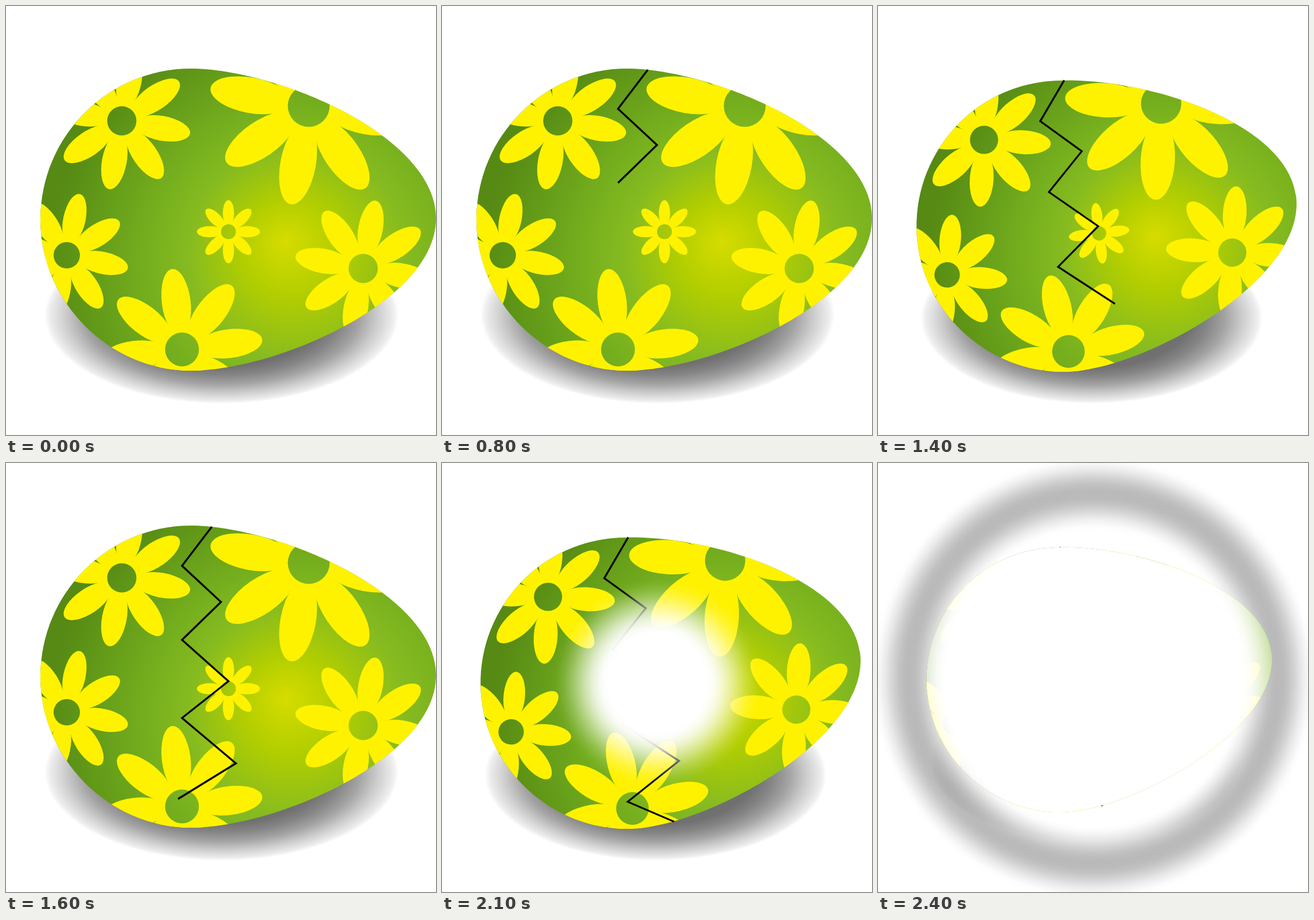
Animation, 750 px wide and 747 px high, one loop 2.5 s. Source, as an HTML page with a canvas:

```html
<!DOCTYPE html>
<html lang="en">
<head>
<meta charset="utf-8">
<title>Hatching egg</title>
<style>
html, body { margin: 0; width: 100%; height: 100%; overflow: hidden; background: #fff; }
canvas { display: block; }
</style>
</head>
<body>
<canvas id="stage" width="750" height="747"></canvas>
<script>
const ctx = document.getElementById('stage').getContext('2d');
const TAU = Math.PI * 2;
const LOOP = 2500;

const egg = new Path2D(
  'M60 372C60 225 180 109 322 109C470 109 750 225 750 370' +
  'C750 515 470 635 322 635C180 635 60 515 60 372Z');

// x, y, petal length, hole radius, turn in degrees
const flowers = [
  [202, 200, 121, 25.5, 10.5],
  [528, 174, 174, 36.5, 10.4],
  [106, 434, 109, 23, 12],
  [307, 598, 141, 29.5, -7],
  [623, 457, 120, 25.5, 10.5],
  [388, 393, 55, 13, 0]
];

const crack = [
  [359, 111], [307, 179], [375, 242], [307, 308], [388, 380],
  [307, 444], [401, 523], [300, 585], [379, 631]
];

// Soft-edged light: radius at half strength and width of the fade
const lights = [[62, 75], [135, 100], [208, 115], [281, 130], [322, 130]];

function gradient(g, stops) {
  for (const [at, color] of stops) g.addColorStop(at, color);
  return g;
}

const skin = gradient(ctx.createRadialGradient(487, 410, 0, 540, 470, 470), [
  [0, '#d6dc00'], [0.18, '#b2ce00'], [0.4, '#86bb20'],
  [0.55, '#78b11e'], [0.75, '#67a01a'], [1, '#568a14']
]);

const shade = gradient(ctx.createRadialGradient(0, 0, 0, 0, 0, 1.03), [
  [0, 'rgba(0,0,0,.58)'], [0.58, 'rgba(0,0,0,.56)'], [0.68, 'rgba(0,0,0,.48)'],
  [0.78, 'rgba(0,0,0,.36)'], [0.88, 'rgba(0,0,0,.2)'],
  [0.97, 'rgba(0,0,0,.07)'], [1, 'rgba(0,0,0,0)']
]);

function disc(x, y, r, fill) {
  ctx.beginPath();
  ctx.arc(x, y, r, 0, TAU);
  ctx.fillStyle = fill;
  ctx.fill();
}

function drawShadow(tilted) {
  ctx.save();
  if (tilted) ctx.transform(0.965, 0, 0, 0.965, 9.7, 24);
  ctx.translate(376, 538);
  ctx.scale(300, 150);
  disc(0, 0, 1.03, shade);
  ctx.restore();
}

function drawFlower([x, y, len, hole, turn]) {
  ctx.fillStyle = '#fff200';
  for (let i = 0; i < 8; i++) {
    const a = (turn + i * 45) * Math.PI / 180;
    const mid = len * 0.59;
    ctx.beginPath();
    ctx.ellipse(x + mid * Math.cos(a), y + mid * Math.sin(a),
      len * 0.41, len * 0.178, a, 0, TAU);
    ctx.fill();
  }
  disc(x, y, len * 0.36, '#fff200');
  disc(x, y, hole, skin);
}

function drawEgg(segments) {
  ctx.save();
  ctx.fillStyle = skin;
  ctx.fill(egg);
  ctx.clip(egg);
  ctx.beginPath();
  ctx.ellipse(389, 170.5, 7.5, 3.5, 0.25, 0, TAU);
  ctx.fillStyle = '#fff';
  ctx.fill();
  flowers.forEach(drawFlower);
  ctx.restore();

  if (!segments) return;
  ctx.beginPath();
  crack.slice(0, segments + 1).forEach(p => ctx.lineTo(...p));
  ctx.strokeStyle = '#000';
  ctx.lineWidth = 3.3;
  ctx.stroke();
}

// Radial fill whose opacity is a function of the light's strength
function glow(light, rgb, opacity) {
  const outer = light.half + light.fade / 2;
  const inner = outer - light.fade;
  const g = ctx.createRadialGradient(light.x, light.y, inner, light.x, light.y, outer);
  for (let i = 0; i <= 16; i++) {
    const u = i / 16;
    const strength = 1 - u * u * (3 - 2 * u);
    g.addColorStop(u, `rgba(${rgb},${opacity(strength).toFixed(4)})`);
  }
  disc(light.x, light.y, outer, g);
}

const white = light => glow(light, '255,255,255', a => a);
const halo = light => glow(light, '0,0,0', a => 1.1 * a * (1 - a));

function draw(time) {
  const step = Math.floor(time / 200);
  const burst = time >= 2000 ? Math.floor((time - 2000) / 100) : -1;
  const tilted = burst >= 0 || step % 2 === 1;
  const segments = Math.min(8, Math.max(0, step - 1));
  const last = burst === 4;

  const light = burst >= 0 && {
    x: last ? 376 : 375, y: last ? 375 : 383,
    half: lights[burst][0], fade: lights[burst][1]
  };

  ctx.setTransform(1, 0, 0, 1, 0, 0);
  ctx.fillStyle = '#fff';
  ctx.fillRect(0, 0, 750, 747);

  const place = () => {
    if (last) ctx.transform(0.909, 0, 0, 0.909, 23.5, 29);
  };
  const tilt = () => {
    place();
    if (tilted) ctx.transform(0.9568, -0.1175, 0.1175, 0.9568, -31.8, 65.4);
  };

  ctx.save();
  place();
  drawShadow(tilted);
  ctx.restore();

  if (light) {
    white(light);
    halo(light);
  }

  ctx.save();
  tilt();
  drawEgg(segments);
  ctx.restore();

  if (light) {
    ctx.save();
    tilt();
    ctx.clip(egg);
    ctx.setTransform(1, 0, 0, 1, 0, 0);
    white(light);
    ctx.restore();
  }
}

const start = performance.now();
function tick() {
  draw((performance.now() - start) % LOOP);
  requestAnimationFrame(tick);
}
tick();
</script>
</body>
</html>
```
